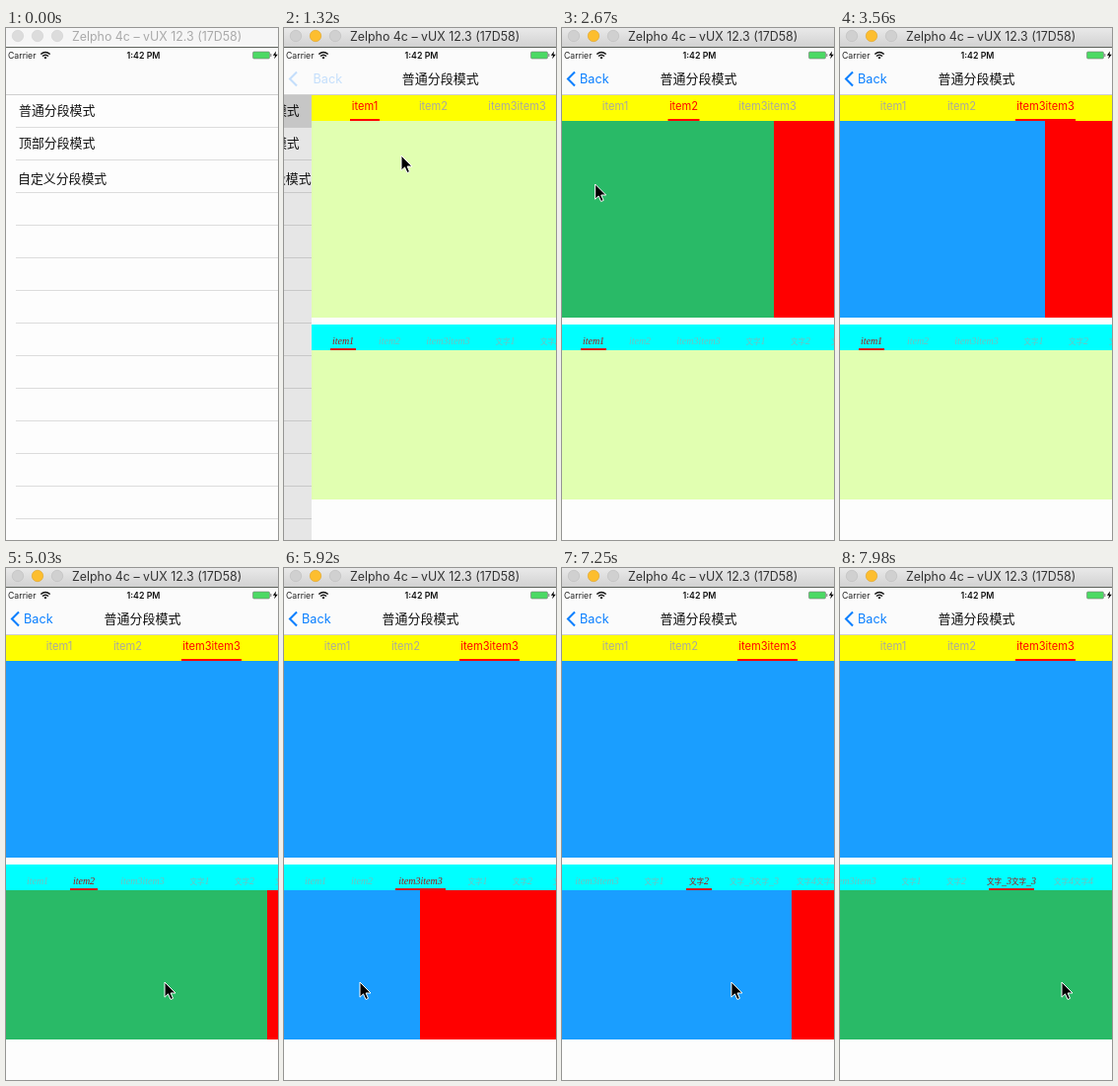
Recreate the animation shown at these times as an HTML page. Size 276 by 518 pixels, loop 8 s.

```html
<!DOCTYPE html>
<html lang="zh-CN">
<head>
<meta charset="utf-8">
<title>Segmented pager</title>
<style>
html, body { margin: 0; width: 100%; height: 100%; overflow: hidden; background: #fdfdfd }
svg { display: block; width: 276px; height: 518px }
text { font-family: Inter, "Noto Sans CJK SC", "Noto Sans CJK", sans-serif; white-space: pre }
.script { font-family: "Liberation Serif", "Noto Sans CJK SC", serif; font-style: italic }
.script tspan { font-family: "Noto Sans CJK SC", "Noto Sans CJK", sans-serif; font-size: 7.5px; font-style: normal }
</style>
</head>
<body>
<svg id="stage" viewBox="0 0 276 518"></svg>
<script>
const LOOP = 8000, FIRST = 290, STEP = 148, W = 276;
const LIME = '#e1ffb1', GREEN = '#29ba67', BLUE = '#1a9eff', RED = '#f00';
const stage = document.getElementById('stage');

// Times are in steps; every swipe lasts SWIPE steps.
const SWIPE = 4, PUSH = 4, PULL = 20;
const topSwipes = [10.2, 14.78], lowSwipes = [27, 31.52, 36, 40.4, 46];
const starts = [...topSwipes, PULL, ...lowSwipes, 52];
const grabs = [205, 95, 120, 215, 172, 215, 180, 215, 225];

const clamp = (v, lo, hi) => Math.min(hi, Math.max(lo, v));
const part = (n, start, len) => clamp((n - start) / len, 0, 1);
const ease = (n, start, len) => { const p = part(n, start, len); return p * p * (3 - 2 * p); };
const sum = (list, f) => list.reduce((total, v, i) => total + f(v, i), 0);

const offsetOf = (swipes, n) => sum(swipes, s => ease(n, s, SWIPE));
const selectedOf = (swipes, n) => swipes.filter(s => n >= s + SWIPE).length;

function layout(list, x, gap) {
  return list.map(([label, w]) => {
    const tab = { label, x, w, mid: x + w / 2 };
    x += w + gap;
    return tab;
  });
}
const topTabs = layout([['item1', 30], ['item2', 32], ['item3item3', 61]], 39, 38.5);
const lowTabs = layout([['item1', 26], ['item2', 28], ['item3item3', 51], ['文字1', 25], ['文字2', 26],
  ['文字_3文字_3', 46], ['文字4文字4', 40]], 19, 20);

// The selected tab is centred as far as the strip allows.
const lastTab = lowTabs[lowTabs.length - 1];
const centred = i => clamp(lowTabs[i].mid - W / 2 - 1, 0, lastTab.x + lastTab.w + 19 - W);
const scrollAt = n => sum(lowSwipes, (s, i) => (centred(i + 1) - centred(i)) * ease(n, s + SWIPE, 2));

// The pointer drags a page left, then glides back for the next drag.
function cursorAt(n) {
  const i = starts.filter(s => s <= n).length - 1;
  if (i < 0) return [
    290 - 171 * ease(n, -1, 3) + 86 * ease(n, 7, 2),
    85 + 44 * ease(n, 4, 3) + 29 * ease(n, 7, 2)];
  const rowY = k => k < 3 ? 158 : 419;
  const release = starts[i] + SWIPE * .65, next = Math.min(i + 1, starts.length - 1);
  const x = grabs[i] - W * ease(Math.min(n, release), starts[i], SWIPE);
  const back = ease(n, release, starts[next] - release);
  return next === i ? [grabs[i], rowY(i)]
    : [x + (grabs[next] - x) * back, rowY(i) + (rowY(next) - rowY(i)) * back];
}

const rect = (x, y, w, h, fill, more = '') =>
  `<rect x="${x}" y="${y}" width="${w}" height="${h}" fill="${fill}" ${more}/>`;
const text = (s, x, y, size, fill, more = '') =>
  `<text x="${x}" y="${y}" font-size="${size}" fill="${fill}" ${more}>${s}</text>`;
const move = (x, y, body) => `<g transform="translate(${x} ${y})">${body}</g>`;
const MID = 'text-anchor="middle"';

function titleBar(active) {
  const light = (x, fill, edge) => `<circle cx="${x}" cy="8" r="5.7" fill="${fill}" stroke="${edge}" stroke-width=".6"/>`;
  const off = active ? ['#d0d0d0', '#bcbcbc'] : ['#dcdcdc', '#d0d0d0'];
  return `<linearGradient id="bar" x2="0" y2="1"><stop stop-color="#e9e9e9"/><stop offset="1" stop-color="#d2d2d2"/></linearGradient>`
    + rect(0, 0, W, 19, active ? 'url(#bar)' : '#f6f6f6')
    + light(12, ...off) + light(32, ...(active ? ['#fdbe2f', '#dea123'] : off)) + light(52, ...off)
    + text('Zelpho 4c – vUX 12.3 (17D58)', 67, 13, 12.4, active ? '#333' : '#aaa')
    + rect(0, 19, W, 1, '#5e625c');
}

const statusBar = text('Carrier', 2, 31, 8.7, '#222')
  + `<path d="M35.3 26.6q4.7-4.4 9.4 0M37 28.6q3-2.8 6 0" fill="none" stroke="#111" stroke-width="1.4"/><circle cx="40" cy="30.2" r="1.1"/>`
  + text('1:42 PM', 139.5, 31, 8.8, '#111', MID + ' font-weight="600"')
  + rect(250.5, 24, 17, 7, '#4cd964', 'rx="1.2" stroke="#777" stroke-width=".6"')
  + rect(268.3, 26, 1, 3, '#777')
  + '<path d="M274 23.5l-3.2 4.3h2.2l-.8 3.5 3.6-4.5h-2.3z"/>';

function navBar(x) {
  return rect(0, 20, W, 47, '#fbfbfb') + statusBar
    + `<g fill="none" opacity="${clamp(1 - x / 36, 0, 1)}"><path d="M13 44.5l-7 7 7 7" stroke="#0a7fff" stroke-width="2.1"/>`
    + text('Back', 18 + x * .41, 56, 12.7, '#0a7fff') + '</g>'
    + text('普通分段模式', 138.5 + x * .72, 56, 13, '#111',
      `${MID} font-weight="500" opacity="${clamp((W - x) / 180, 0, 1)}"`)
    + rect(0, 67, W, 1, '#cfcfcf');
}

function table(x, pressed) {
  const done = 1 - x / W;
  let rows = rect(0, 67, W, 451, '#fdfdfd');
  if (pressed) rows += rect(0, 67, W, 33, '#d9d9d9');
  for (let y = 100; y < 518; y += 33) rows += rect(10, y, W - 10, 1, '#dcdcdc');
  rows += text('普通分段模式', 13, 87.7, 12.9, '#111') + text('顶部分段模式', 13, 120.7, 12.9, '#111')
    + text('自定义分段模式', 12, 156.5, 12.9, '#111');
  return move(-83 * done, 0, rows) + rect(0, 68, W, 450, '#000', `opacity="${done * .1}"`);
}

// Pages not yet reached show the red backing.
function pager(y, h, colors, offset, selected) {
  const edge = i => clamp(Math.round((i - offset) * W), 0, W);
  return colors.map((c, i) =>
    rect(edge(i), y, edge(i + 1) - edge(i), h, i > selected ? RED : c)).join('')
    + rect(edge(colors.length), y, W - edge(colors.length), h, RED);
}

const tabs = (list, selected, draw, lineY, lineFill) =>
  list.map((t, i) => draw(t.label, t.mid, i === selected)).join('')
  + rect(list[selected].x, lineY, list[selected].w, 2, lineFill);

const topTab = (s, x, on) => text(s, x, 83, 11.1, on ? RED : '#a9a9a0', MID);
const lowTab = (s, x, on) => text(s.replace(/[一-龥]+/g, '<tspan>$&</tspan>'), x, 319.5, 10,
  on ? '#a01818' : '#9aa', `${MID} class="script" opacity="${on ? 1 : .75}"`);

function page(n) {
  const pull = .246 * Math.sin(Math.PI * part(n, PULL, SWIPE));
  const topSel = selectedOf(topSwipes, n), lowSel = selectedOf(lowSwipes, n);
  return rect(0, 68, W, 450, '#fdfdfd')
    + rect(0, 68, W, 26, '#ff0') + tabs(topTabs, topSel, topTab, 92, RED)
    + pager(94, 199, [LIME, GREEN, BLUE], offsetOf(topSwipes, n) + pull, topSel)
    + rect(0, 300, W, 26, '#0ff')
    + move(-scrollAt(n), 0, tabs(lowTabs, lowSel, lowTab, 324, '#d01c1c'))
    + pager(326, 151, [LIME, GREEN, BLUE, LIME, BLUE, GREEN], offsetOf(lowSwipes, n), lowSel);
}

function scene(n) {
  const x = Math.floor(W * (1 - part(n, PUSH, 5)) ** 2.46);
  return (x > 0 ? table(x, n > 2) : '')
    + (x < W ? move(x, 0, page(n)) : '')
    + navBar(x) + titleBar(n > 2)
    + move(...cursorAt(n), '<path d="M0 0V15.2l3.5-3.3 2.5 5.6 2.5-1.1-2.4-5.4h4.9z" stroke="#fff" stroke-width="1"/>');
}

let shown = null;
function frame(now) {
  const t = now % LOOP;
  const n = t < FIRST ? -2 : Math.floor((t - FIRST + 8) / STEP);
  if (n !== shown) stage.innerHTML = scene(shown = n);
  requestAnimationFrame(frame);
}
requestAnimationFrame(frame);
</script>
</body>
</html>
```
